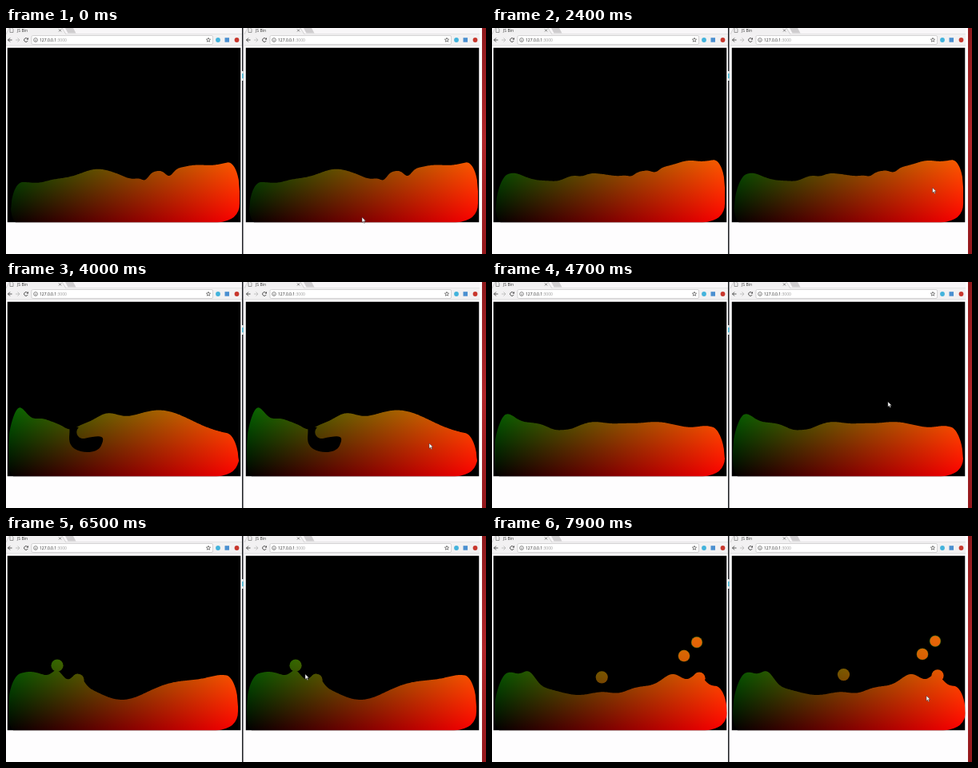
Recreate the animation shown at these times as an HTML page with a canvas. Size 600x283 px, loop 8 s.

```html
<!DOCTYPE html>
<html lang="en">
<head>
<meta charset="utf-8">
<title>Fluid in two windows</title>
<style>
html, body { margin: 0; width: 100%; height: 100%; overflow: hidden; }
canvas { display: block; }
</style>
</head>
<body>
<canvas id="stage" width="600" height="283"></canvas>
<script>
const ctx = document.getElementById('stage').getContext('2d');
const LOOP = 8000, SHIFT = 298, TAU = Math.PI * 2;
const VIEW = { x: 1.5, y: 24.5, w: 292, h: 219 };
const FLOOR = VIEW.y + VIEW.h;

// A pose is a sloped water line between two walls plus swells of [centre, offset, width].
const poses = [
  { at: 1850, left: 6, right: 292, level: 194, slope: -0.082, swells:
    [[40, 3, 15], [112, -8, 24], [160, 8, 18], [174, 6, 6], [204, 8, 7], [235, -3, 20], [280, -3, 15]] },
  { at: 3000, left: 3, right: 290, level: 206, slope: -0.16, swells:
    [[26, -33, 24], [83, 5, 12], [112, 7, 9], [188, 3, 20], [246, -7, 15]] },
  { at: 4000, left: 3, right: 291, level: 172, slope: 0.07, swells:
    [[17, -16, 12], [45, -4, 12], [80, 7, 12], [126, -12, 20], [195, -25, 52]] },
  { at: 5400, left: 3, right: 291, level: 186, slope: 0, swells:
    [[25, -15, 16], [58, -6, 14], [97, 5, 11], [184, 6, 20], [270, -13, 18]] },
  { at: 6500, left: 3, right: 290, level: 180, slope: 0, swells:
    [[30, -10, 25], [64, -11, 9], [90, -13, 9], [145, 25, 45], [270, -6, 22]] },
  { at: 7900, left: 3, right: 294, level: 188, slope: 0, swells:
    [[22, -17, 16], [46, -17, 12], [108, 11, 35], [158, 7, 18], [226, -15, 18], [257, -14, 11]] }
];
const cursorKeys = [
  { at: 0, x: 445, y: 237 }, { at: 500, x: 450, y: 250 }, { at: 1800, x: 508, y: 205 },
  { at: 3000, x: 593, y: 195 }, { at: 4000, x: 529, y: 202 }, { at: 5400, x: 461, y: 98 },
  { at: 5700, x: 370, y: 116 }, { at: 6500, x: 374, y: 173 }, { at: 7120, x: 513, y: 125 },
  { at: 7540, x: 554, y: 122 }, { at: 7900, x: 543, y: 200 }
];
const drops = [
  { born: 5380, x: 165, y: 106 },
  { born: 5625, x: 90, y: 115 },
  { born: 5780, x: 64, y: 118 },
  { born: 7110, x: 259, y: 125 },
  { born: 7120, x: 270, y: 125, vx: -170 },
  { born: 7380, x: 240, y: 127 },
  { born: 7540, x: 256, y: 122 }
];

const mix = (a, b, u) => a + (b - a) * u;

// The two keys around t and the eased progress between them.
function between(keys, t) {
  const i = keys.findIndex(k => k.at > t);
  if (i <= 0) {
    const k = i ? keys[keys.length - 1] : keys[0];
    return [k, k, 0];
  }
  const a = keys[i - 1], b = keys[i];
  return [a, b, (1 - Math.cos(Math.PI * (t - a.at) / (b.at - a.at))) / 2];
}

function rect(x, y, w, h, color) {
  ctx.fillStyle = color;
  ctx.fillRect(x, y, w, h);
}

function disc(x, y, r, color) {
  ctx.fillStyle = color;
  ctx.beginPath();
  ctx.arc(x, y, r, 0, TAU);
  ctx.fill();
}

function line(color, width, ...p) {
  ctx.strokeStyle = color;
  ctx.lineWidth = width;
  ctx.beginPath();
  for (let i = 0; i < p.length; i += 2) ctx.lineTo(p[i], p[i + 1]);
  ctx.stroke();
}

function arc(x, y, r, from = 0, to = TAU) {
  ctx.beginPath();
  ctx.arc(x, y, r, from, to);
  ctx.stroke();
}

function poly(color, ...p) {
  ctx.fillStyle = color;
  ctx.beginPath();
  for (let i = 0; i < p.length; i += 2) ctx.lineTo(p[i], p[i + 1]);
  ctx.fill();
}

function text(s, x, y, color) {
  ctx.font = '5px "Open Sans", sans-serif';
  ctx.fillStyle = color;
  ctx.fillText(s, x, y);
  return x + ctx.measureText(s).width;
}

function ramp(x1, y1, x2, y2, color) {
  const g = ctx.createLinearGradient(x1, y1, x2, y2);
  g.addColorStop(0, '#000');
  g.addColorStop(1, color);
  return g;
}
const redRamp = ramp(VIEW.x, 0, VIEW.x + VIEW.w, 0, '#f00');
const greenRamp = ramp(0, FLOOR, 0, VIEW.y, '#0f0');

// Red grows to the right, green grows upwards.
function fillFluid(path) {
  ctx.fillStyle = '#000';
  ctx.fill(path);
  ctx.globalCompositeOperation = 'lighter';
  for (const g of [redRamp, greenRamp]) {
    ctx.fillStyle = g;
    ctx.fill(path);
  }
  ctx.globalCompositeOperation = 'source-over';
}

const surface = (pose, x) => pose.swells.reduce(
  (y, [c, h, w]) => y + h * Math.exp(-(((x - c) / w) ** 2)), pose.level + pose.slope * x);

// How far the surface sinks at distance d from a wall.
function shoulder(d) {
  const u = Math.max(0, 1 - d / 15);
  return 36 * (1 - Math.sqrt(1 - u * u));
}

function drawFluid(t) {
  const [a, b, u] = between(poses, t);
  const left = mix(a.left, b.left, u), right = mix(a.right, b.right, u);
  const path = new Path2D(), steps = 240;
  path.moveTo(left + 6, FLOOR);
  path.quadraticCurveTo(left, FLOOR - 6, left, FLOOR - 20);
  for (let i = 0; i <= steps; i++) {
    const x = mix(left, right, i / steps);
    path.lineTo(x, mix(surface(a, x), surface(b, x), u) + shoulder(x - left) + shoulder(right - x));
  }
  path.lineTo(right, FLOOR - 24);
  path.quadraticCurveTo(right, FLOOR - 2, right - 28, FLOOR);
  fillFluid(path);
}

// The air pocket under the breaking wave opens and closes again.
function drawPocket(t) {
  const size = 1 - Math.abs(t - 4000) / 450;
  if (size <= 0) return;
  ctx.save();
  ctx.translate(85, 184);
  ctx.scale(size, size);
  ctx.fillStyle = '#000';
  ctx.beginPath();
  ctx.moveTo(-6, -3);
  ctx.bezierCurveTo(-4, 8, -10, 17, 1, 25);
  ctx.bezierCurveTo(11, 31, 29, 31, 34, 21);
  ctx.bezierCurveTo(40, 8, 35, 7, 13, 12);
  ctx.bezierCurveTo(5, 13, 0, 4, 6, -2);
  ctx.fill();
  ctx.restore();
}

function drawDrop({ born, x, y, vx = 0 }, t) {
  const age = (t - born) / 1000;
  if (age < 0 || age > 1.2) return;
  x += vx * age;
  y += 85 * age * age;
  const r = Math.min(7.6, 6.2 + 2 * age);
  const ball = new Path2D();
  ball.arc(x, y, r, 0, TAU);
  fillFluid(ball);
  // A fresh drop is redder, with a green rim, and blends in as it falls.
  const fresh = Math.max(0, 1 - age / 0.7);
  ctx.fillStyle = `rgba(235,65,15,${0.9 * fresh})`;
  ctx.fill(ball);
  ctx.strokeStyle = `rgba(30,115,20,${fresh})`;
  ctx.lineWidth = 1;
  ctx.stroke(ball);
  if (age > 0.1) return;
  for (let i = 0; i < 24; i++) {
    const d = 1.15 * Math.sqrt(i), turn = i * 2.4;
    disc(x + d * Math.cos(turn), y + d * Math.sin(turn), 0.7, `hsl(${i * 47 % 110},65%,38%)`);
  }
}

function drawView(t, lag) {
  ctx.save();
  ctx.beginPath();
  ctx.rect(VIEW.x, VIEW.y, VIEW.w, VIEW.h);
  ctx.clip();
  rect(VIEW.x, VIEW.y, VIEW.w, VIEW.h, '#000');
  for (const d of drops) drawDrop(d, t - lag);
  drawFluid(t);
  drawPocket(t);
  ctx.restore();
}

function drawBrowser() {
  rect(0, 0, 295, 283, '#fefdfe');
  rect(0, 0, 295, 8, '#f8f6f8');
  poly('#f1f0f1', 4, 0, 70, 0, 75, 8, 0, 8);
  line('#bbb', 0.6, 0, 8, 4, 0);
  line('#bbb', 0.6, 70, 0, 75, 8, 295, 8);
  poly('#cfcdcf', 74, 0, 84, 0, 87.5, 6.5, 77.5, 6.5);
  rect(0, 8, 295, 14, '#f2f1f2');
  line('#ccc', 0.6, 0, 22, 295, 22);

  line('#666', 0.6, 5, 0, 5, 5.5, 9, 5.5, 9, 1.5, 7.5, 0);
  text('JS Bin', 14, 5, '#333');
  line('#555', 0.7, 66, 1.5, 69, 4.5);
  line('#555', 0.7, 69, 1.5, 66, 4.5);

  for (const [x, dir, color] of [[2.5, 1, '#444'], [17, -1, '#bbb']]) {
    line(color, 0.9, x, 15, x + 5 * dir, 15);
    line(color, 0.9, x + 2.5 * dir, 12.5, x, 15, x + 2.5 * dir, 17.5);
  }
  ctx.strokeStyle = '#444';
  arc(25, 15, 2.4, 0.4, 5.5);
  poly('#444', 25.5, 14.5, 28, 14.5, 28, 12);

  ctx.beginPath();
  ctx.roundRect(32, 9.5, 226.5, 11, 1.5);
  ctx.fillStyle = '#fff';
  ctx.fill();
  ctx.strokeStyle = '#c4c3c4';
  ctx.lineWidth = 0.7;
  ctx.stroke();
  ctx.strokeStyle = '#555';
  arc(37, 15, 2.4);
  line('#555', 0.7, 37, 14.4, 37, 16.5);
  text(':3000', text('127.0.0.1', 42, 16.8, '#222'), 16.8, '#999');

  ctx.beginPath();
  for (let i = 0; i < 10; i++) {
    const r = i % 2 ? 1.2 : 2.8, a = i * Math.PI / 5 - Math.PI / 2;
    ctx.lineTo(253 + r * Math.cos(a), 15 + r * Math.sin(a));
  }
  ctx.closePath();
  ctx.stroke();
  disc(265, 15, 2.9, '#43b3dc');
  rect(273.5, 12.2, 5.5, 5.5, '#4a8fd0');
  disc(288.5, 15, 2.9, '#c8372d');
}

function drawCursor(t) {
  const [a, b, u] = between(cursorKeys, t);
  const tip = [0, 0, 0, 6.4, 1.5, 5.1, 2.6, 7.4, 3.6, 6.9, 2.6, 4.7, 4.6, 4.6];
  ctx.save();
  ctx.translate(mix(a.x, b.x, u), mix(a.y, b.y, u));
  poly('#fff', ...tip);
  line('#333', 0.5, ...tip, 0, 0);
  ctx.restore();
}

function draw(t) {
  for (const side of [0, 1]) {
    ctx.save();
    ctx.translate(side * SHIFT, 0);
    drawBrowser();
    // The right window trails a little once several drops are in the air.
    drawView(t, side && t > 7000 ? 25 : 0);
    ctx.restore();
  }
  rect(592, 0, 3, 283, '#fefdfe');
  rect(295, 0, 1.6, 283, '#1a1c20');
  rect(296.6, 0, 1.4, 283, '#f4f2f4');
  rect(295, 54, 1.6, 12, '#e4eef0');
  rect(295, 57, 1.6, 6, '#48b6d4');
  const wall = ctx.createLinearGradient(0, 0, 0, 283);
  wall.addColorStop(0, '#8f1a1d');
  wall.addColorStop(0.5, '#b0262a');
  wall.addColorStop(1, '#94181c');
  rect(595, 0, 5, 283, wall);
  drawCursor(t);
}

function tick() {
  draw(performance.now() % LOOP);
  requestAnimationFrame(tick);
}
tick();
</script>
</body>
</html>
```
